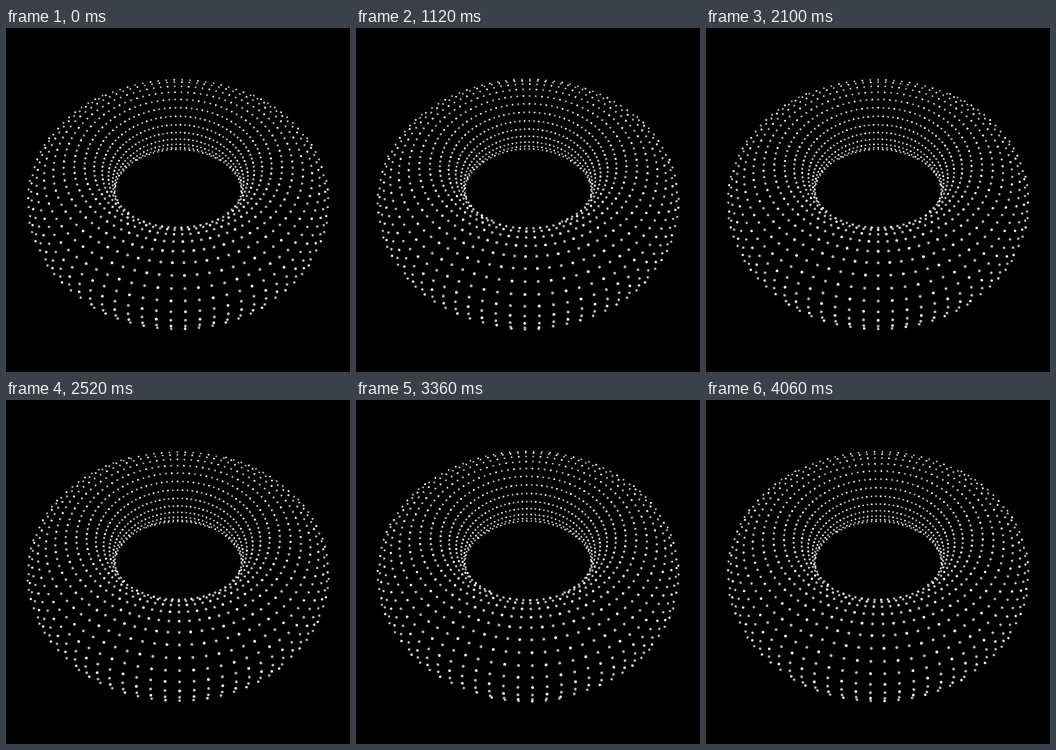
These frames come from a looping animation (640x640 px, 4200 ms). An HTML page with a canvas:

```html
<!DOCTYPE html>
<html>
<head>
<meta charset="utf-8">
<title>Dotted torus</title>
<style>
  html, body { margin: 0; height: 100%; overflow: hidden; background: #000; }
  canvas { display: block; }
</style>
</head>
<body>
<canvas id="stage" width="640" height="640"></canvas>
<script>
const ctx = document.getElementById('stage').getContext('2d');
const { sin, cos, PI } = Math;

const LOOP = 4200, STEP = 140;
const COLUMNS = 84, ROWS = 28;
const RING = 0.2974, TUBE = 0.1155;        // radii, in units of camera distance
const ELEVATION = 0.8566, PITCH = 0.0532;  // camera height and upward shift
const FOCAL = 645, CX = 320.3, CY = 319.6;
const DOT = 1.9;
const SHADES = ['#f0f0f0', '#b8b8b8', '#b0b0b0'];
const camY = sin(ELEVATION), camZ = cos(ELEVATION);

function drawDot(column, row, progress) {
  const around = (column + 0.5 + progress) * 2 * PI / COLUMNS;
  const tube = 0.03 + (row + 2 * progress) * 2 * PI / ROWS;

  const radius = RING + TUBE * cos(tube);
  const x = radius * sin(around), y = TUBE * sin(tube), z = radius * cos(around);

  // Skip dots whose surface faces away from the camera
  const facing = -x * cos(tube) * sin(around)
    + (camY - y) * sin(tube)
    + (camZ - z) * cos(tube) * cos(around);
  if (facing <= 0) return;

  const up = y * camZ - z * camY;
  const away = 1 - z * camZ - y * camY;
  const v = up * cos(PITCH) + away * sin(PITCH);
  const depth = away * cos(PITCH) - up * sin(PITCH);

  ctx.fillStyle = SHADES[(column + row + 100) % 3];
  ctx.beginPath();
  ctx.arc(CX + FOCAL * x / depth, CY - FOCAL * v / depth, DOT / depth, 0, 2 * PI);
  ctx.fill();
}

function draw() {
  const progress = Math.floor(performance.now() % LOOP / STEP) * STEP / LOOP;
  ctx.fillStyle = '#000';
  ctx.fillRect(0, 0, 640, 640);
  // Rows start and end on the hidden underside, so the loop is seamless
  for (let column = -COLUMNS / 2; column < COLUMNS / 2; column++)
    for (let row = -6; row < ROWS - 6; row++) drawDot(column, row, progress);
  requestAnimationFrame(draw);
}
draw();
</script>
</body>
</html>
```
